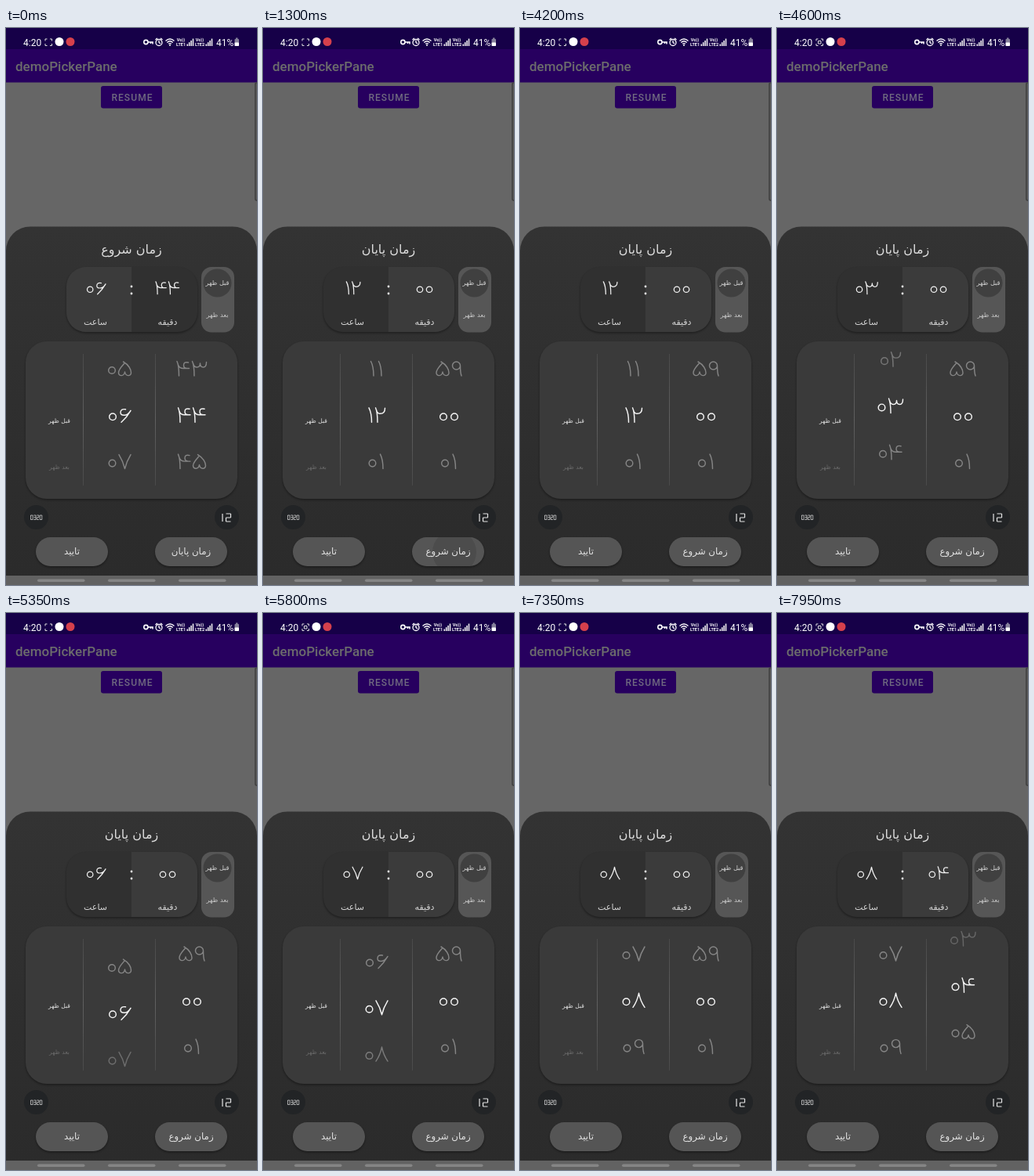
These frames come from a looping animation (320 by 711 pixels, 8000 ms). An HTML page with a canvas:

```html
<!DOCTYPE html>
<html lang="fa">
<head>
<meta charset="utf-8">
<title>Time picker</title>
<style>
html, body { margin: 0; width: 100%; height: 100%; overflow: hidden; background: #666; }
canvas { display: block; width: 100vw; height: 100vh; }
</style>
</head>
<body>
<canvas id="stage"></canvas>
<script>
const W = 320, H = 711, LOOP = 8000, ROW = 59.3, MID = 494.3;
const canvas = document.getElementById('stage');
const ctx = canvas.getContext('2d');
const LATIN = 'Roboto, sans-serif';
const ARABIC = '"DejaVu Sans", sans-serif';
const START = 'زمان شروع', END = 'زمان پایان', AM = 'قبل ظهر', PM = 'بعد ظهر';

// Thin Persian numerals: [advance, outline], centred on the origin.
const DIGITS = [
  [14, 'M4.3 2A4.3 4.3 0 1 1 -4.3 2A4.3 4.3 0 1 1 4.3 2Z'],
  [10, 'M-2 -9.5Q1.5 -3 1.5 9'],
  [15, 'M-6 -9.5Q-3.5 -4 -3.5 9M-5 -7Q-4 -2 0 -2Q6 -2 6 -9'],
  [22, 'M-9 -9.5Q-6.5 -4 -6.5 9M-8 -7Q-7 -2 -3 -2Q1 -2 1 -7Q1 -2 5 -2Q9 -2 9 -8.5'],
  [19, 'M-8 -9.5Q-5.5 -4 -5.5 9M-6.5 -5Q-5 -.5 0 -.5H7.5M6.5 -8Q.5 -9.5 .5 -4.5Q.5 -.5 5 -.5'],
  [19, 'M-2 -9C5 -5 8 1 8 5C8 10 1 10 0 4C-1 10 -8 10 -8 5C-8 1 -4 -3 0 -7.5'],
  [17, 'M1 -7.5Q-5.5 -8.5 -5.5 -3.5Q-5.5 0 -1 0Q4 0 7.5 -6Q3 2 -4.5 9'],
  [18, 'M-7.5 -9Q-2 0 0 9Q2 0 7.5 -9'],
  [18, 'M-7.5 9Q-2 1 0 -9Q2 1 7.5 9'],
  [16, 'M5 -4A5 5 0 1 1 -5 -4A5 5 0 1 1 5 -4Q5 5 6.5 9']
].map(([adv, d]) => [adv, new Path2D(d)]);

// Seven-segment strokes in a 1 x 2 cell, and the segments lit per digit.
const SEGS = { a: [0,0,1,0], b: [1,0,1,1], c: [1,1,1,2], d: [0,2,1,2], e: [0,1,0,2], f: [0,0,0,1], g: [0,1,1,1] };
const LIT = { 0: 'abcdef', 1: 'bc', 2: 'abged', 3: 'abgcd' };

const clamp = (v, a = 0, b = 1) => Math.min(b, Math.max(a, v));
const white = a => `rgba(255,255,255,${a})`;

function box(x, y, w, h, r, fill) {
  ctx.beginPath();
  ctx.roundRect(x, y, w, h, r);
  ctx.fillStyle = fill;
  ctx.fill();
}

function disc(x, y, r, fill) {
  ctx.beginPath();
  ctx.arc(x, y, r, 0, 7);
  ctx.fillStyle = fill;
  ctx.fill();
}

function line(d, color, width = 1) {
  ctx.strokeStyle = color;
  ctx.lineWidth = width;
  ctx.stroke(new Path2D(d));
}

function shadowed(draw) {
  ctx.save();
  ctx.shadowColor = 'rgba(0,0,0,.4)';
  ctx.shadowBlur = 3;
  ctx.shadowOffsetY = 1.5;
  draw();
  ctx.restore();
}

function label(s, x, y, font, color, align = 'left') {
  ctx.font = font;
  ctx.textAlign = align;
  ctx.direction = 'ltr';
  ctx.textBaseline = 'alphabetic';
  ctx.fillStyle = color;
  ctx.fillText(s, x, y);
}

function persian(s, x, y, size, color) {
  ctx.font = `${size}px ${ARABIC}`;
  ctx.textAlign = 'center';
  ctx.direction = 'rtl';
  ctx.textBaseline = 'middle';
  ctx.fillStyle = color;
  ctx.fillText(s, x, y);
}

function numeral(n, x, y, scale, color) {
  const pair = [Math.floor(n / 10), n % 10].map(i => DIGITS[i]);
  ctx.save();
  ctx.translate(x, y);
  ctx.scale(scale, scale);
  ctx.strokeStyle = color;
  ctx.lineWidth = 1.45;
  ctx.lineCap = ctx.lineJoin = 'round';
  ctx.translate(-(pair[0][0] + pair[1][0]) / 2, 0);
  for (const [adv, path] of pair) {
    ctx.translate(adv / 2, 0);
    ctx.stroke(path);
    ctx.translate(adv / 2, 0);
  }
  ctx.restore();
}

function segments(s, x, y, w, h, gap, width) {
  ctx.strokeStyle = '#e4e4e4';
  ctx.lineWidth = width;
  ctx.beginPath();
  [...s].forEach((ch, i) => {
    const ox = x + i * (w + gap);
    for (const k of LIT[ch]) {
      const [a, b, c, d] = SEGS[k];
      ctx.moveTo(ox + a * w, y + b * h / 2);
      ctx.lineTo(ox + c * w, y + d * h / 2);
    }
  });
  ctx.stroke();
}

// Fling keys: time, row, rows per second.
const FLING = [[4200, 0, 5], [4600, 3.2, 6], [5350, 5.73, 2.5], [6350, 7.75, .8], [7150, 8, 0]];

function hourPos(t) {
  if (t <= FLING[0][0]) return 0;
  for (let i = 1; i < FLING.length; i++) {
    const [t0, p0, v0] = FLING[i - 1], [t1, p1, v1] = FLING[i];
    if (t >= t1) continue;
    const d = t1 - t0, u = (t - t0) / d, q = 1 - u, k = d / 1000;
    return p0 * q * q * (1 + 2 * u) + p1 * u * u * (3 - 2 * u) + k * u * q * (v0 * q - v1 * u);
  }
  return 8;
}

const minutePos = t => 4.32 * clamp((t - 7450) / 500) ** 1.25;
const hour = n => ((n + 11) % 12 + 12) % 12 + 1;
const minute = n => (n % 60 + 60) % 60;

function wheel(x, pos, value) {
  const near = Math.round(pos);
  ctx.save();
  ctx.beginPath();
  ctx.rect(x - 40, 406, 80, 184);
  ctx.clip();
  for (let i = near - 2; i <= near + 2; i++) {
    const dy = (i - pos) * ROW;
    const fade = clamp((100 - Math.abs(dy)) / 36);
    numeral(value(i), x, MID + dy, 1, white(i === near ? .95 : .38 * fade));
  }
  ctx.restore();
}

function signal(x) {
  for (let i = 0; i < 4; i++) box(x + i * 2.4, 20.5 - i * 2.3, 1.6, 2.5 + i * 2.3, 0, '#eee');
}

function statusBar(t) {
  box(0, 0, W, 27, 0, '#160048');
  label('4:20', 22, 22.5, `12px ${LATIN}`, '#fff');
  line('M50 16.5V14H52.5M56 14H58.5V16.5M58.5 20V22.5H56M52.5 22.5H50V20', '#ddd');
  if (t % 1000 >= 500) line('M52.5 16.5H56V20H52.5Z', '#ddd');
  disc(68, 17.5, 5.5, '#fff');
  disc(82, 17.5, 5.5, '#d5404c');

  line('M181 18H187V20.5M184.5 18V20', '#fff', 1.6);
  line('M181 18A2.6 2.6 0 1 1 175.8 18A2.6 2.6 0 1 1 181 18Z', '#fff', 1.6);
  line('M199 18.5A4 4 0 1 1 191 18.5A4 4 0 1 1 199 18.5ZM195 16V18.5L197 20M190.5 15L193 13M197 13L199.5 15', '#fff', 1.3);
  line('M203.5 16.5Q209 11.5 214.5 16.5M205.3 18.5Q209 15 212.7 18.5M207.2 20.3Q209 18.8 210.8 20.3', '#fff', 1.3);
  disc(209, 22, 1, '#fff');
  ['1', '2'].forEach((n, i) => {
    const x = 223 + i * 24;
    label('Vo))', x, 17, `bold 5.5px ${LATIN}`, '#fff', 'center');
    label('LTE' + n, x, 23, `bold 5.5px ${LATIN}`, '#fff', 'center');
    signal(x + 7.5);
  });
  label('41%', 268, 22.5, `12px ${LATIN}`, '#fff');
  box(291.5, 14, 5.5, 9, 1, '#85809a');
  box(293, 12.5, 2.5, 2, 0, '#85809a');
  box(291.5, 18.5, 5.5, 4.5, 1, '#fff');
}

function backdrop() {
  ctx.fillStyle = '#666';
  ctx.fillRect(0, 0, W, H);
  box(0, 27, W, 42.5, 0, '#27005f');
  label('demoPickerPane', 12, 55, `500 17px ${LATIN}`, '#6c6c6c');
  box(121, 74, 78, 28.5, 3, '#27005f');
  ctx.letterSpacing = '1.1px';
  label('RESUME', 161, 93, `500 12px ${LATIN}`, '#706a80', 'center');
  ctx.letterSpacing = '0px';
  box(317, 69, 8, 152, 3, '#414141');
  box(318.5, 70.5, 8, 149, 2, '#5a5a5a');
}

function header(ended, h, m) {
  persian(ended ? END : START, 160, 284, 16, '#ddd');
  shadowed(() => box(77, 305, 167, 83, 25, '#303030'));
  if (ended) box(160, 305, 84, 83, [0, 25, 25, 0], '#3b3b3b');
  else box(77, 305, 83, 83, [25, 0, 0, 25], '#3b3b3b');
  numeral(h, 114.5, 332, .86, '#f2f2f2');
  numeral(m, 206, 332, .86, '#f2f2f2');
  disc(160, 330, 1.4, '#eee');
  disc(160, 339, 1.4, '#eee');
  persian('ساعت', 114, 376, 11, '#d4d4d4');
  persian('دقیقه', 206, 376, 11, '#d4d4d4');

  box(249, 305, 42, 83.5, 13, '#565656');
  disc(269.5, 325.5, 18, '#404040');
  persian(AM, 269.5, 325.5, 8.2, '#d0d0d0');
  persian(PM, 269.5, 367, 8.2, '#c8c8c8');
}

function picker(hp, mp, ended) {
  shadowed(() => box(25, 400, 270, 201, 27, '#3a3a3a'));
  const g = ctx.createLinearGradient(0, 416, 0, 584);
  g.addColorStop(0, '#4a4a4a');
  g.addColorStop(.5, '#606060');
  g.addColorStop(1, '#4a4a4a');
  for (const x of [98, 190]) box(x, 416, 1, 168, 0, g);
  persian(AM, 68, 502, 7.6, '#e0e0e0');
  persian(PM, 68, 561, 7.6, '#696969');
  wheel(144.5, ended ? hp : 6, hour);
  wheel(237, ended ? mp : 44, minute);
}

function button(x, text) {
  shadowed(() => box(x, 650, 92, 37, 18.5, '#555'));
  return () => persian(text, x + 46, 669, 11.8, '#e4e4e4');
}

function ripple(t) {
  const u = (t - 1300) / 350;
  if (u < 0 || u >= 1) return;
  ctx.save();
  ctx.beginPath();
  ctx.roundRect(190, 650, 92, 37, 18.5);
  ctx.clip();
  disc(244 - 8 * u, 669, 28 + 36 * u, `rgba(0,0,0,${.11 * (1 - u * u)})`);
  ctx.restore();
}

function sheet(t) {
  const ended = t >= 1300, hp = hourPos(t), mp = minutePos(t);
  const g = ctx.createLinearGradient(0, 253, 0, 700);
  g.addColorStop(0, '#333');
  g.addColorStop(1, '#2b2b2b');
  box(0, 253.5, W, 446, [31, 31, 0, 0], g);
  header(ended, ended ? hour(Math.round(hp)) : 6, ended ? minute(Math.round(mp)) : 44);
  picker(hp, mp, ended);

  disc(38.5, 624.5, 15.5, '#222426');
  disc(281.5, 624.5, 15.5, '#222426');
  segments('0320', 31.5, 622, 2.6, 5.5, 1.3, .7);
  segments('12', 270, 620, 6, 10, 4.5, 1.2);

  button(38, 'تایید')();
  const caption = button(190, ended ? START : END);
  ripple(t);
  caption();
}

function navBar() {
  box(0, 699, W, 12, 0, '#626262');
  for (const x of [40, 130, 220]) box(x, 703.5, 60.5, 3.5, 1.75, '#858585');
}

function fit() {
  const dpr = window.devicePixelRatio || 1;
  canvas.width = Math.round(innerWidth * dpr);
  canvas.height = Math.round(innerHeight * dpr);
}

function frame(now) {
  const t = Math.floor((now % LOOP) / 50) * 50;
  ctx.setTransform(canvas.width / W, 0, 0, canvas.height / H, 0, 0);
  backdrop();
  statusBar(t);
  sheet(t);
  navBar();
  requestAnimationFrame(frame);
}

addEventListener('resize', fit);
fit();
requestAnimationFrame(frame);
</script>
</body>
</html>
```
